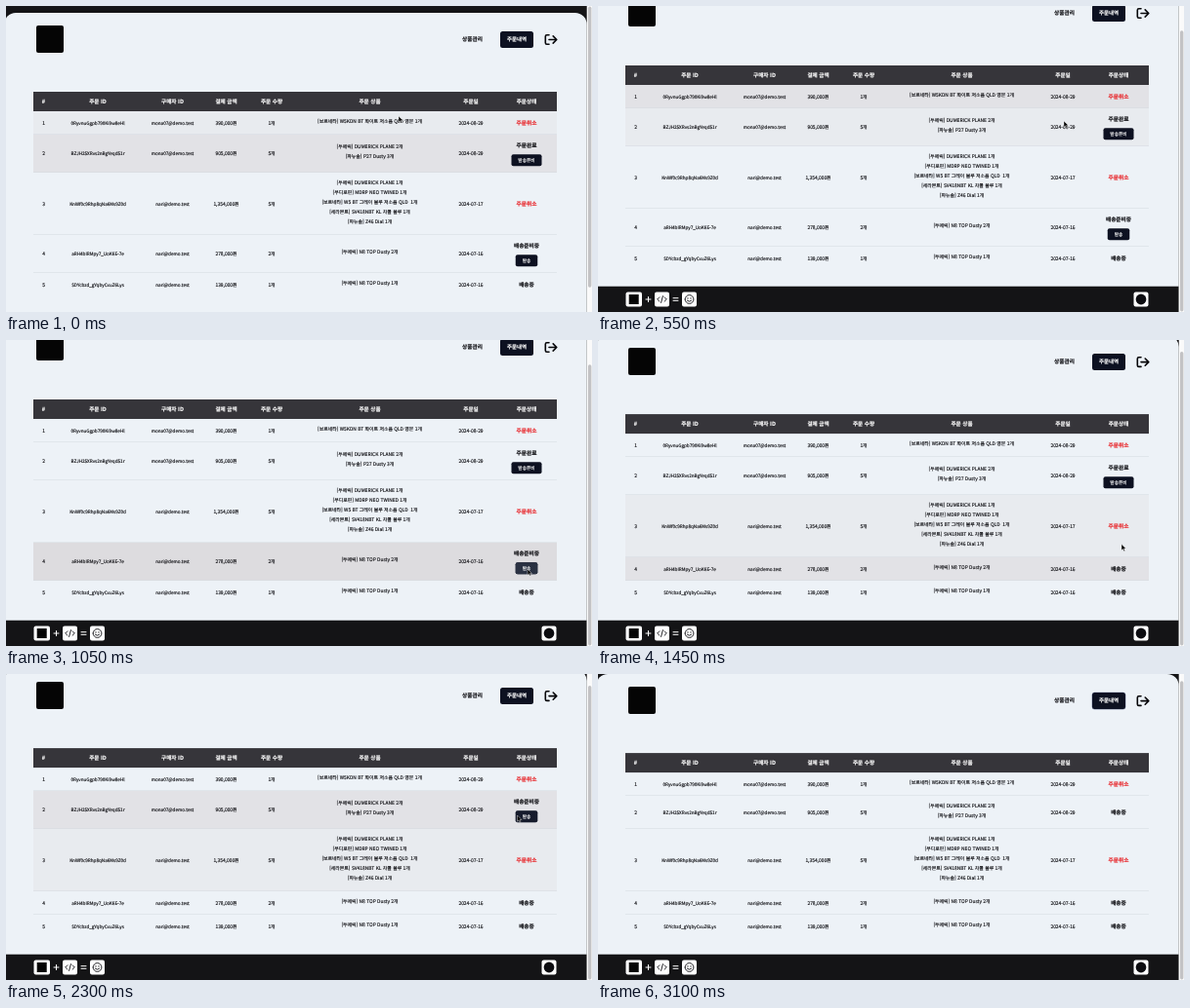
Write an HTML page that moves like this. It is 600 by 314 pixels and loops after 3300 ms.

```html
<!DOCTYPE html>
<html lang="ko">
<head>
<meta charset="utf-8">
<title>주문내역</title>
<style>
html, body { margin: 0; width: 100%; height: 100%; overflow: hidden; background: #141416; }
svg { display: block; width: 100vw; height: 100vh; }
text {
  font-family: "Noto Sans CJK KR", "Noto Sans CJK", "Noto Sans", sans-serif;
  text-anchor: middle; white-space: pre; text-rendering: geometricPrecision;
  fill: currentColor; stroke: currentColor; stroke-width: 0.14;
}
</style>
</head>
<body>
<svg id="stage" viewBox="0 0 600 314"></svg>
<script>
const LOOP = 3300, STEP = 50, VIEW = 314;
const PANEL = '#edf2f7', DARK = '#141416', INK = '#0c0c10', NAVY = '#0d1121', RED = '#e8282c';
const TABLE_X = 28, TABLE_W = 536, HEAD_TOP = 88, HEAD_H = 20;
const COLS = [38.5, 94, 170.5, 225.5, 272, 372.5, 476, 533];
const HEADS = ['#', '주문 ID', '구매자 ID', '결제 금액', '주문 수량', '주문 상품', '주문일', '주문상태'];
const MAIL_A = 'mona07@demo.test', MAIL_B = 'nari@demo.test';

const CANCELLED = { text: '주문취소', action: '', color: RED };
const PAID = { text: '주문완료', action: '발송준비', color: INK };
const PACKING = { text: '배송준비중', action: '발송', color: INK };
const SHIPPED = { text: '배송중', action: '', color: INK };

const ORDERS = [
  { cells: ['0RyvnuGgpb790Ki9w8eHl', MAIL_A, '390,000원', '1개', '2024-08-29'],
    items: ['[보르네타] W5KDN BT 화이트 저소음 QLD 영문 1개'], status: () => CANCELLED },
  { cells: ['BZJH25XRvs2nBgYeqd51r', MAIL_A, '905,000원', '5개', '2024-08-29'],
    items: ['[두메릭] DUMERICK PLANE 2개', '[파뉴솔] P27 Dusty 3개'],
    status: t => t < 2000 ? PAID : t < 2550 ? PACKING : SHIPPED },
  { cells: ['KnWf0c9Rhp8qNa6Ms9Z0d', MAIL_B, '1,354,000원', '5개', '2024-07-17'],
    items: ['[두메릭] DUMERICK PLANE 1개', '[무디로핀] MDRP NEO TWINED 1개',
      '[보르네타] W5 BT 그레이 블루 저소음 QLD  1개', '[세라본트] SV418NBT KL 차콜 블루 1개', '[파뉴솔] Z46 Dial 1개'],
    status: () => CANCELLED },
  { cells: ['aRH4bIRMpy7_UoK6E-7e', MAIL_B, '278,000원', '2개', '2024-07-16'],
    items: ['[두메릭] N8 TOP Dusty 2개'], status: t => t < 1350 ? PACKING : SHIPPED },
  { cells: ['SDYcbzd_gYqbyCxuZ6Lys', MAIL_B, '139,000원', '1개', '2024-07-16'],
    items: ['[두메릭] N8 TOP Dusty 1개'], status: () => SHIPPED }
];

// pointer stops: time, x, y
const STOPS = [
  [-150, 398, 145], [0, 402, 113], [300, 474, 113], [550, 477, 118], [750, 551, 228], [1000, 534, 235],
  [1350, 534, 235], [1700, 541, 146], [2000, 541, 146], [2150, 536, 166], [2300, 523.5, 145],
  [2550, 530, 147], [3050, 524, -10]
];

const svg = document.getElementById('stage');

function el(parent, tag, attrs = {}, content) {
  const node = document.createElementNS('http://www.w3.org/2000/svg', tag);
  set(node, attrs);
  if (content !== undefined) node.textContent = content;
  return parent.appendChild(node);
}
function set(node, attrs) {
  for (const key in attrs) node.setAttribute(key, attrs[key]);
}
const rect = (parent, x, y, width, height, fill, rx = 0) => el(parent, 'rect', { x, y, width, height, fill, rx });
const label = (parent, x, mid, size, content, color = INK, weight = 400) =>
  el(parent, 'text', { x, y: mid + size * 0.36, 'font-size': size, 'font-weight': weight, color }, content);
const stroke = (parent, d, color, width) =>
  el(parent, 'path', { d, fill: 'none', stroke: color, 'stroke-width': width, 'stroke-linecap': 'round', 'stroke-linejoin': 'round' });
const move = (node, x, y) => node.setAttribute('transform', `translate(${x} ${y})`);
const clamp = v => Math.max(0, Math.min(1, v));

function pointer(t) {
  const i = STOPS.findIndex(s => s[0] > t);
  const [t0, x0, y0] = STOPS.at(i < 0 ? -1 : i - 1);
  if (i < 0) return { x: x0, y: y0 };
  const [t1, x1, y1] = STOPS[i], p = (t - t0) / (t1 - t0);
  return { x: x0 + (x1 - x0) * p, y: y0 + (y1 - y0) * p };
}

function layout(t) {
  let y = HEAD_TOP + HEAD_H;
  const rows = ORDERS.map(({ items, status }) => {
    const state = status(t), n = items.length;
    const height = Math.max(n === 1 ? 23.9 : 14 + n * 10, state.action ? 39 : 0);
    const width = state.action && 5 + state.action.length * 6.5 + (state.action.length < 3 ? 4.5 : 0);
    const top = y;
    y += height;
    return { state, top, height, width };
  });
  const foot = y + 16.9, full = foot + 26.3;
  const scroll = Math.min(27 * clamp((t - 300) / 250) ** 2, full - VIEW);
  return { rows, foot, full, scroll };
}

// Which row and button the pointer is on
function target(t) {
  const { rows, scroll } = layout(t), { x, y } = pointer(t);
  const row = rows.findIndex(r => y + scroll >= r.top && y + scroll < r.top + r.height);
  if (row < 0) return { row };
  const { top, height, width } = rows[row];
  const dy = y + scroll - top - height / 2 - 6.8;
  return { row, button: width > 0 && Math.abs(x - COLS[7]) < width / 2 && Math.abs(dy) < 6 };
}

function buildTop(page) {
  rect(page, -2, 7, 596.7, 400, PANEL, 12);
  rect(page, 31, 20, 28, 28, '#050505', 2);
  label(page, 477.5, 34, 5.7, '상품관리', INK, 700);
  const button = rect(page, 506, 26, 34, 17, NAVY, 2.5);
  label(page, 523, 34, 5.5, '주문내역', '#fff', 700);
  stroke(page, 'M556 29.7H553.8Q552.3 29.7 552.3 31.2V37.8Q552.3 39.3 553.8 39.3H556M556 34.5H563.6M560.2 30.9L563.8 34.5L560.2 38.1', '#08080b', 1.6);
  rect(page, TABLE_X, HEAD_TOP, TABLE_W, HEAD_H, '#36353a');
  HEADS.forEach((h, i) => label(page, COLS[i], HEAD_TOP + 10, 5.6, h, '#fff', 700));
  return button;
}

function buildRow(page, { cells, items }, index) {
  const g = el(page, 'g');
  const shade = rect(g, TABLE_X, 0, TABLE_W, 0, '#dddcdf');
  const line = rect(g, TABLE_X, 0, TABLE_W, 0.5, index < ORDERS.length - 1 ? '#d3d8de' : 'none');
  const mid = el(g, 'g');
  const [id, mail, price, count, date] = cells;
  [index + 1, id, mail, price, count, '', date].forEach((v, i) =>
    label(mid, COLS[i], 0, v === id || v === mail ? 4.6 : 4.9, v));
  items.forEach((v, i) => label(mid, COLS[5], -1.8 + (i - (items.length - 1) / 2) * 10, 4.9, v));
  const status = label(mid, COLS[7], 0, 5.7, '', INK, 700);
  const button = rect(mid, 0, 0.8, 0, 12, NAVY, 2);
  const glow = rect(mid, 0, 0.8, 0, 12, '#2a3142', 2);
  const action = label(mid, COLS[7], 6.8, 4.7, '', '#fff');
  return { g, shade, line, mid, status, button, glow, action };
}

function buildFooter() {
  const g = el(svg, 'g');
  rect(g, 0, 0, 594.7, 40, DARK);
  [28.5, 58, 86, 548.5].forEach((x, i) => rect(g, x, 5.8, i ? 15 : 16.5, 15, '#fff', 2));
  rect(g, 31.7, 8.3, 10, 10, '#050505');
  stroke(g, 'M49 13.3H54M51.5 10.8V15.8M77 12H82M77 14.6H82', '#fff', 1);
  stroke(g, 'M62.9 11.1L60.7 13.3L62.9 15.5M68.1 11.1L70.3 13.3L68.1 15.5M66.4 9.9L64.6 16.7', INK, 0.9);
  stroke(g, 'M89.1 13.3a4.4 4.4 0 1 0 8.8 0a4.4 4.4 0 1 0 -8.8 0M91.4 14.6Q93.5 16.6 95.6 14.6', INK, 0.9);
  stroke(g, 'M92 12.2h0M95 12.2h0', INK, 1.3);
  el(g, 'circle', { cx: 556, cy: 13.3, r: 5.4, fill: INK });
  return g;
}

rect(svg, 0, 0, 600, VIEW, DARK);
const page = el(svg, 'g');
const navButton = buildTop(page);
const rows = ORDERS.map((order, i) => buildRow(page, order, i));
const footer = buildFooter();
rect(svg, 594.7, 0, 5.3, VIEW, '#fafafa');
const thumb = rect(svg, 596, 0, 3.4, 10, '#c2c2c4', 1.7);
const cursor = el(svg, 'path', {
  d: 'M0 0V6.2L1.5 4.9L2.5 7.1L3.5 6.6L2.6 4.5H4.5Z', fill: '#000', stroke: '#fff', 'stroke-width': 0.4
});

function drawRow(row, { state, top, height, width }, hover, press) {
  const { text, action, color } = state;
  move(row.g, 0, top);
  move(row.mid, 0, height / 2);
  set(row.shade, { height, opacity: hover });
  set(row.line, { y: height - 0.5 });
  set(row.status, { color, y: (action ? -8.8 : 0) + 2.05 });
  row.status.textContent = text;
  row.action.textContent = action;
  const box = { x: COLS[7] - width / 2, width: +width };
  set(row.button, box);
  set(row.glow, { ...box, opacity: press });
}

function draw(t) {
  const view = layout(t);
  // Hover colours fade: average over the last few moments
  const past = [1, 2, 3].map(n => target(t - n * STEP));
  const share = test => past.filter(test).length / past.length;
  rows.forEach((row, i) => drawRow(row, view.rows[i],
    share(p => p.row === i), share(p => p.row === i && p.button)));

  move(page, 0, -view.scroll);
  move(footer, 0, view.foot - view.scroll);
  set(thumb, { y: view.scroll * VIEW / view.full + 0.5, height: VIEW * VIEW / view.full - 1 });
  set(navButton, { stroke: t >= 2900 ? '#1c2850' : 'none', 'stroke-width': 0.4 });
  const { x, y } = pointer(t);
  move(cursor, x, y);
}

const start = performance.now();
function tick() {
  const t = (performance.now() - start) % LOOP;
  draw(Math.floor(t / STEP) * STEP);
  requestAnimationFrame(tick);
}
tick();
</script>
</body>
</html>
```
